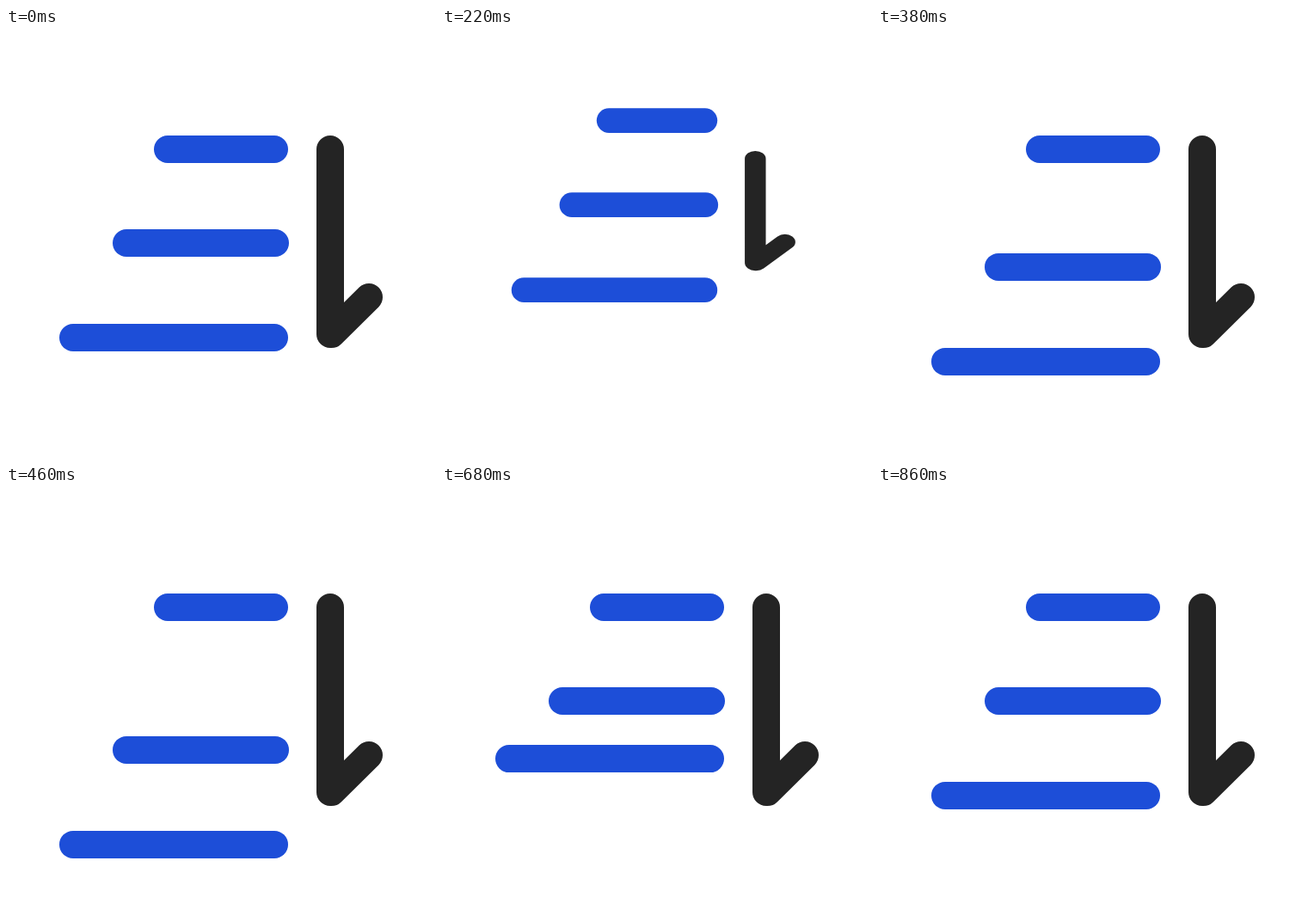
These frames come from a looping animation (500x500 px, 1.6 s). An HTML page:

```html
<!DOCTYPE html>
<html>
<head>
<meta charset="utf-8">
<style>
html, body { margin: 0; width: 100%; height: 100%; overflow: hidden; background: #fff; }
svg { display: block; width: 100vw; height: 100vh; }
path { fill: none; stroke: #1d4ed8; stroke-width: 32; stroke-linecap: round; stroke-linejoin: round; }
#arrow { stroke: #242424; }
</style>
</head>
<body>
<svg viewBox="0 0 500 500">
  <g id="icon">
    <path class="bar" d="M188 141H312"/>
    <path class="bar" d="M140 250H313"/>
    <path class="bar" d="M78 360H312"/>
    <path id="arrow" d="M377 141V356H378.5L422 313"/>
  </g>
</svg>
<script>
const LOOP = 1600, STEP = 20;
const START = 37, SQUASHED = 171, STRETCHED = 297, SETTLED = 375;
const icon = document.getElementById('icon');
const arrow = document.getElementById('arrow');
const bars = document.querySelectorAll('.bar');

// Smooth rise from 0 to 1 between times a and b
function ease(t, a, b) {
  const u = Math.min(1, Math.max(0, (t - a) / (b - a)));
  return u * u * (3 - 2 * u);
}

// Out and back again, furthest halfway through
function hop(t, a, b, size) {
  const mid = (a + b) / 2;
  return size * (ease(t, a, mid) - ease(t, mid, b));
}

function place(el, x, y, sx, sy) {
  el.setAttribute('transform',
    `translate(${x} ${y}) scale(${sx} ${sy}) translate(${-x} ${-y})`);
}

function draw(t) {
  const squash = ease(t, START, SQUASHED);
  const stretch = ease(t, SQUASHED, STRETCHED);
  const settle = ease(t, STRETCHED, SETTLED);

  const zoom = 1 - 0.1 * (squash - settle);
  place(icon, 250, 250, zoom, zoom);
  place(arrow, 377, 141,
    1 - 0.45 * (stretch - settle),
    1 - 0.75 * squash + 1.12 * stretch - 0.37 * settle);

  // Each hop carries its own bar and all bars below it
  const hops = [
    hop(t, START, 306, -70),
    hop(t, 306, 606, 57),
    hop(t, 606, 863, -70)
  ];
  let y = 0;
  bars.forEach((bar, i) => {
    y += hops[i];
    bar.setAttribute('transform', `translate(0 ${y})`);
  });
}

let start;
function tick(now) {
  start ??= now;
  const t = (now - start) % LOOP;
  draw(Math.floor(t / STEP) * STEP);
  requestAnimationFrame(tick);
}
draw(0);
requestAnimationFrame(tick);
</script>
</body>
</html>
```
